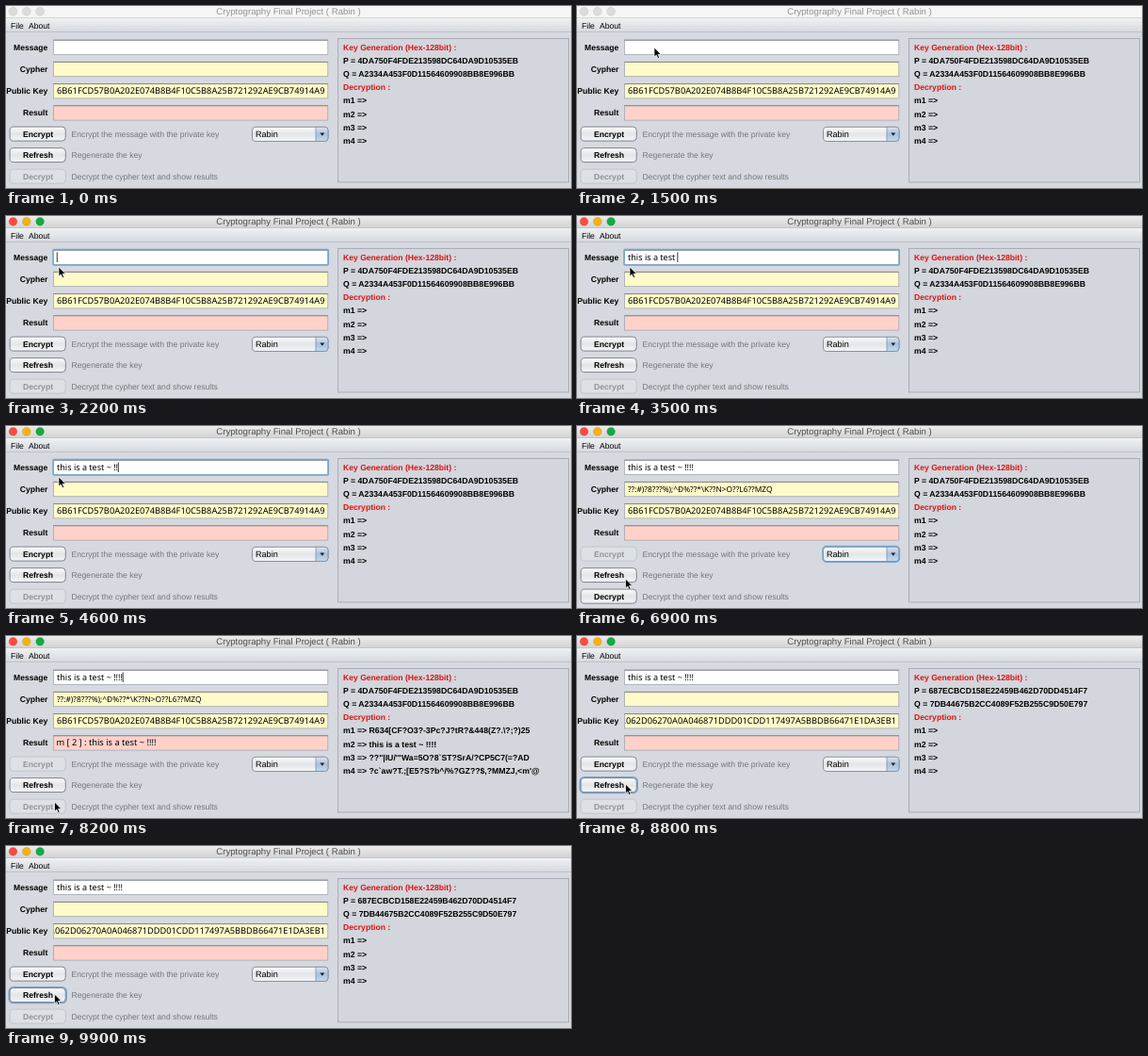
An HTML page that plays this animation: 600x193 px, repeating every 10 s.

```html
<!DOCTYPE html>
<html lang="en">
<head>
<meta charset="utf-8">
<title>Rabin demo</title>
<style>
html, body { margin: 0; width: 100%; height: 100%; overflow: hidden; background: #d6d9df; }
svg { display: block; width: 600px; height: 193px; }
text { font: 8.6px "Liberation Sans", Arial, sans-serif; fill: #000; white-space: pre; text-rendering: geometricPrecision; }
.title { font-size: 9.65px; text-anchor: middle; }
.label { font-weight: bold; text-anchor: end; }
.button { font-weight: bold; text-anchor: middle; }
.hint { fill: #73767b; }
.input { font: 9.25px "Noto Sans", sans-serif; }
.typed { font-size: 9.05px; }
.tight { font-size: 8.35px; }
.log { font-size: 8.7px; font-weight: bold; }
.head { font-weight: bold; fill: #dc1212; }
</style>
</head>
<body>
<svg id="stage" viewBox="0 0 600 193">
  <defs>
    <linearGradient id="active" x2="0" y2="1"><stop stop-color="#ececec"/><stop offset="1" stop-color="#d2d2d2"/></linearGradient>
    <linearGradient id="menu" x2="0" y2="1"><stop stop-color="#eff1f4"/><stop offset="1" stop-color="#d6d9df"/></linearGradient>
    <linearGradient id="face" x2="0" y2="1"><stop stop-color="#fbfbfc"/><stop offset=".5" stop-color="#e3e5e9"/><stop offset="1" stop-color="#f3f5f8"/></linearGradient>
    <linearGradient id="pressed" x2="0" y2="1"><stop stop-color="#7b8ca3"/><stop offset="1" stop-color="#a9b5c6"/></linearGradient>
    <linearGradient id="arrow" x2="0" y2="1"><stop stop-color="#dce6f1"/><stop offset=".5" stop-color="#a9c1dc"/><stop offset="1" stop-color="#c6d8ea"/></linearGradient>
    <clipPath id="keyClip"><rect x="51.5" y="82" width="289" height="16"/></clipPath>
  </defs>
</svg>
<script>
const LOOP = 10000, STEP = 100;
const ACTIVATE = 1700, ENCRYPT = 6000, DECRYPT = 7100, REFRESH = 8600, LAST_KEY = 4800;
const MESSAGE = "this is a test ~ !!!!";
const CYPHER = "??:#)?8???%);^Ð%??*\\K??N>O??L6??MZQ";
const KEYS = [
  { pub: "6B61FCD57B0A202E074B8B4F10C5B8A25B721292AE9CB74914A9",
    p: "4DA750F4FDE213598DC64DA9D10535EB", q: "A2334A453F0D11564609908BB8E996BB" },
  { pub: "A062D06270A0A046871DDD01CDD117497A5BBDB66471E1DA3EB1",
    p: "687ECBCD158E22459B462D70DD4514F7", q: "7DB44675B2CC4089F52B255C9D50E797" }
];
const ROOTS = [
  "R634[CF?O3?-3Pc?J?tR?&448(Z?.\\?;?)25",
  MESSAGE,
  "??\"|IU/'\"Wa=5O?8`ST?SrA/?CP5C7(=?AD",
  "?c`aw?T.;[E5?S?b^/%?GZ??$,?MMZJ,<m'@"
];
// time, x, y of the pointer tip
const PATH = [
  [200, 443, 128], [700, 250, 82], [1300, 82, 44], [1700, 82, 44], [2200, 56, 54],
  [4900, 56, 54], [5400, 48, 132], [6400, 48, 132], [6900, 51.5, 162], [7000, 51.5, 176],
  [8200, 51.5, 176], [8500, 51.5, 157], [10000, 51.5, 157]
];
// start time, focused control; "caret" is the message field without its ring
const FOCUS = [[0, ""], [ACTIVATE, "message"], [5800, "Encrypt"], [ENCRYPT, "method"],
  [7000, "Decrypt"], [DECRYPT, "caret"], [8500, "Refresh"]];

const stage = document.getElementById("stage");

function add(tag, attrs, parent = stage) {
  const node = document.createElementNS("http://www.w3.org/2000/svg", tag);
  for (const name in attrs) node.setAttribute(name, attrs[name]);
  return parent.appendChild(node);
}
function rect(x, y, width, height, fill, more) {
  return add("rect", { x, y, width, height, fill, ...more });
}
function write(x, y, cls, str = "") {
  const node = add("text", { x, y, class: cls });
  node.textContent = str;
  return node;
}
function ring(x, y, width, height, rx) {
  return rect(x, y, width, height, "none", { rx, stroke: "#73a4d1", "stroke-width": 1.5 });
}
function show(node, on) {
  node.setAttribute("visibility", on ? "visible" : "hidden");
}

// Window frame and menu
rect(0, 0, 600, 193, "#d6d9df");
const bar = rect(0, 0, 600, 13, "#f5f5f5");
rect(0, 12.5, 600, .7, "#b5b7ba");
const lights = ["#fa4b42", "#f7b211", "#12ab3f"].map((color, i) => {
  const dot = add("circle", { cx: 7.5 + 14.3 * i, cy: 5.8, r: 4.4, "stroke-width": .5 });
  return { dot, color };
});
const title = write(300, 9, "title", "Cryptography Final Project ( Rabin )");
rect(0, 13, 600, 14, "url(#menu)");
rect(0, 27, 600, .8, "#b9bdc5");
write(5, 23.5, "", "File");
write(24, 23.5, "", "About");

// Input fields
[["Message", "#fff"], ["Cypher", "#fffbc8"], ["Public Key", "#fffbc8"], ["Result", "#ffd1c9"]].forEach(([name, fill], i) => {
  const y = 36 + 23.2 * i;
  write(44.3, y + 10.6, "label", name);
  rect(50.5, y, 291.3, 15.5, fill, { stroke: "#a3a8b1", "stroke-width": .8 });
  rect(50.5, y - .2, 291.3, .9, "#7f848d");
});
const messageRing = ring(50, 35.5, 292.3, 16.5, 1);
const message = write(54, 46.8, "input typed");
const caret = rect(54, 38.5, .8, 10.5, "#000");
const cypher = write(54, 69.6, "input tight");
const keyGroup = add("g", { "clip-path": "url(#keyClip)" });
const publicKey = write(54, 93, "input");
keyGroup.append(publicKey);
const result = write(53.4, 116.4, "input");

// Buttons
const hints = ["Encrypt the message with the private key", "Regenerate the key", "Decrypt the cypher text and show results"];
const buttons = ["Encrypt", "Refresh", "Decrypt"].map((name, i) => {
  const y = 127.8 + 22.5 * i;
  const glow = ring(3.2, y - .6, 61, 16.8, 4.6);
  const face = rect(4.1, y + .3, 59.2, 15, "url(#face)", { rx: 4, "stroke-width": .9 });
  const text = write(34, y + 10.8, "button", name);
  write(69.6, y + 10.8, "hint", hints[i]);
  return { name, glow, face, text };
});

// Method picker
rect(261.5, 128.3, 80.5, 15.2, "url(#face)", { rx: 3.5, stroke: "#828892", "stroke-width": .9 });
add("path", { d: "M329 128.3H338.5Q342 128.3 342 131.8V140Q342 143.5 338.5 143.5H329Z", fill: "url(#arrow)", stroke: "#6f87a3", "stroke-width": .7 });
add("path", { d: "M333.4 134.6H338.2L335.8 137.8Z", fill: "#16202c" });
write(265, 138.9, "", "Rabin").style.fontSize = "9.1px";
const methodRing = ring(261, 127.6, 81.4, 16.6, 4);

// Log panel
rect(352.5, 34.5, 245, 152.4, "#d3d6dc", { stroke: "#a5a9b1", "stroke-width": .9 });
write(358, 47.3, "head", "Key Generation (Hex-128bit) :");
const pLine = write(358, 61.4, "log");
const qLine = write(358, 75.4, "log");
write(358, 89.4, "head", "Decryption :");
const rootLines = ROOTS.map((_, i) => write(358, 103.4 + 14.1 * i, "log"));

const pointer = add("path", { d: "M0 0V10L2.3 7.9L3.9 11.5L5.6 10.8L4 7.3H7.2Z", fill: "#000", stroke: "#fff", "stroke-width": .7 });

function pointAt(t) {
  const i = Math.max(1, PATH.findIndex(k => k[0] >= t));
  const [t0, x0, y0] = PATH[i - 1], [t1, x1, y1] = PATH[i];
  const u = (t - t0) / (t1 - t0), e = u * u * (3 - 2 * u);
  return [x0 + (x1 - x0) * e, y0 + (y1 - y0) * e];
}
function typedAt(t) {
  if (t < 2300) return 0;
  if (t < 4000) return Math.min(15, 1 + Math.floor((t - 2300) / 80));
  return Math.min(MESSAGE.length, 16 + Math.floor((t - 4000) / 160));
}

function render(t) {
  const active = t >= ACTIVATE;
  const focus = FOCUS.filter(f => f[0] <= t).pop()[1];
  const encrypted = t >= ENCRYPT && t < REFRESH;
  const decrypted = t >= DECRYPT && t < REFRESH;
  const key = KEYS[t >= REFRESH ? 1 : 0];

  bar.setAttribute("fill", active ? "url(#active)" : "#f5f5f5");
  title.style.fill = active ? "#4c4c4c" : "#929292";
  for (const { dot, color } of lights) {
    dot.setAttribute("fill", active ? color : "#dcdcdc");
    dot.setAttribute("stroke", active ? "#0003" : "#c2c2c2");
  }

  message.textContent = MESSAGE.slice(0, typedAt(t));
  cypher.textContent = encrypted ? CYPHER : "";
  result.textContent = decrypted ? "m [ 2 ] : " + MESSAGE : "";
  publicKey.textContent = key.pub;
  publicKey.setAttribute("x", key === KEYS[0] ? 54 : 339);
  publicKey.style.textAnchor = key === KEYS[0] ? "start" : "end";
  pLine.textContent = "P = " + key.p;
  qLine.textContent = "Q = " + key.q;
  rootLines.forEach((line, i) => {
    line.textContent = `m${i + 1} => ` + (decrypted ? ROOTS[i] : "");
  });

  const editing = focus === "message" || focus === "caret";
  const since = t >= DECRYPT ? t - DECRYPT : Math.max(0, t - LAST_KEY);
  show(messageRing, focus === "message");
  show(methodRing, focus === "method");
  show(caret, editing && Math.floor(since / 500) % 2 === 0);
  caret.setAttribute("x", 53.8 + message.getComputedTextLength());

  const down = { Encrypt: 5800, Decrypt: 7000, Refresh: 8500 };
  for (const { name, glow, face, text } of buttons) {
    const off = name === "Encrypt" ? encrypted : name === "Decrypt" && (!encrypted || decrypted);
    const held = t >= down[name] && t < down[name] + 100;
    show(glow, focus === name);
    face.setAttribute("fill", held ? "url(#pressed)" : off ? "#dde0e5" : "url(#face)");
    face.setAttribute("stroke", off ? "#bfc3ca" : "#747a84");
    text.style.fill = off ? "#8f9297" : "#000";
  }

  show(pointer, t >= PATH[0][0]);
  pointer.setAttribute("transform", `translate(${pointAt(Math.max(t, PATH[0][0]))})`);
}

const start = performance.now();
let shown = -1;
function tick() {
  const t = Math.floor(((performance.now() - start) % LOOP) / STEP) * STEP;
  if (t !== shown) render(shown = t);
  requestAnimationFrame(tick);
}
tick();
</script>
</body>
</html>
```
